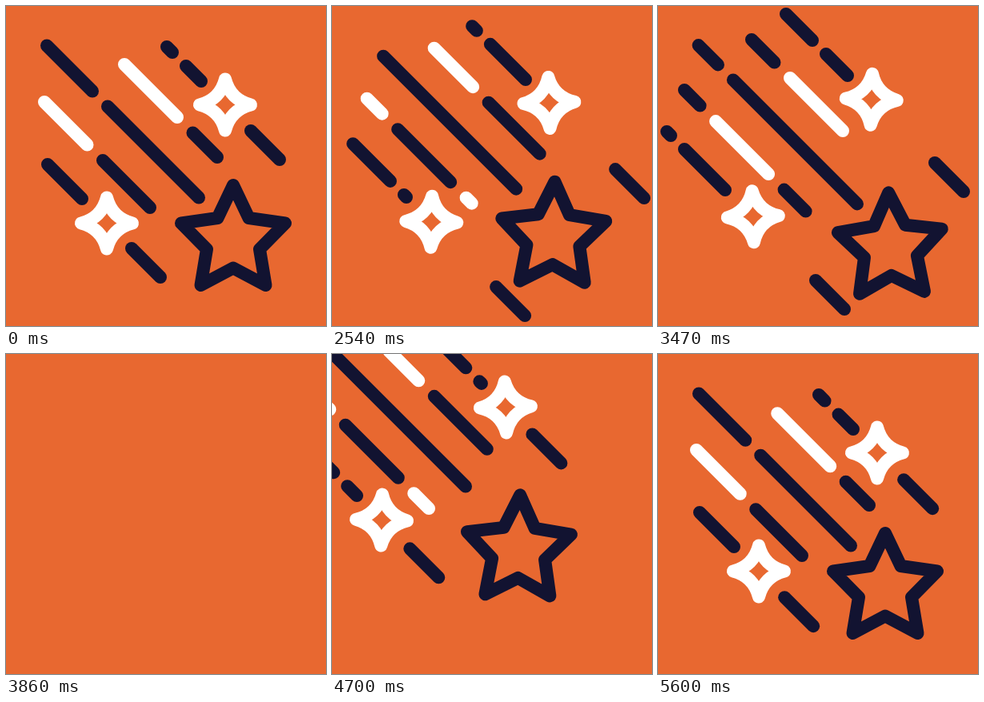
These frames come from a looping animation (400x400 px, 5630 ms). An HTML page with a canvas:

```html
<!DOCTYPE html>
<html lang="en">
<head>
<meta charset="utf-8">
<title>Shooting star</title>
<style>
  html, body { margin: 0; width: 100%; height: 100%; overflow: hidden; background: #e86830; }
  canvas { display: block; width: 100vmin; height: 100vmin; }
</style>
</head>
<body>
<canvas id="stage" width="400" height="400"></canvas>
<script>
const ctx = document.getElementById('stage').getContext('2d');
const ORANGE = '#e86830', DARK = '#121331', WHITE = '#fff';
const LOOP = 5630, REST = 2030, MOVE = 3600, STEP = 30, WRAP = 1830;
const TIMES = [0, 960, 1440, 2370, 2970, 3580];

// Every trail lies on the diagonal y = x + d and shows a moving dash pattern between from and to.
// flow: distance the dashes have run back at each of TIMES.
const striped = { dash: 66, period: 85.5, flow: [0, 69, 139, 330, 438, 513] };
const ahead = { dash: 36, period: 102, flow: [0, 103, 164, 272, 337, 408], back: 0, launch: 1440 };
const trails = [
  { d: -150, from: 201, to: 244, first: 225, dash: 51, period: 68, grow: 34,
    flow: [0, 57, 144, 268, 374, 408], back: 7, launch: 1440, enter: 308 },
  { ...striped, d: -75, from: 132, to: 264, first: 148, colors: [WHITE, DARK],
    back: 15, launch: 1440, enter: 326 },
  { d: -1.5, from: 51, to: 241, first: 127, dash: 166, period: 185,
    flow: [0, 116, 226, 395, 479, 555], back: 16, launch: 1250, lag: 40, enter: 305 },
  { ...striped, d: 72, from: 48, to: 180, first: 35.5, colors: [WHITE, DARK],
    back: 15, launch: 1270, lag: 170, enter: 318 },
  { d: 146, from: 52, to: 95, first: 49, dash: 51, period: 68, grow: 34,
    flow: [0, 57, 145, 265, 345, 408], back: 7, launch: 1440, enter: 345 },
  { ...ahead, d: -150, from: 303, to: 393, first: 306, enter: 308 },
  { ...ahead, d: 146, from: 154, to: 244, first: 157, enter: 330 }
];

const starPath = new Path2D(
  'M0-69L19.5-28L65-21.5L33 11L40.5 56L0 34.5L-40.5 56L-33 11L-65-21.5L-19.5-28Z');
const sparkPath = new Path2D(
  'M0-32Q6.5-6.5 32 0Q6.5 6.5 0 32Q-6.5 6.5-32 0Q-6.5-6.5 0-32Z');
// nudge: small displacement while shaking; even / odd: tilt in degrees on alternate steps
const shapes = [
  { path: starPath, color: DARK, x: 284, y: 293, back: 16, launch: 1250, enter: 265,
    even: -2, odd: 1.5, nudge: [[-1.4, 1.4], [-1.5, 1.5]] },
  { path: sparkPath, color: WHITE, x: 274, y: 123.5, back: 9, launch: 1440, enter: 308,
    even: 2, odd: -2, nudge: [[1.8, 2.3], [0, 0]] },
  { path: sparkPath, color: WHITE, x: 126, y: 271.5, back: 6, launch: 1440, enter: 345,
    even: -2, odd: 1.5, nudge: [[-1.2, -2.2], [0, 0]] }
];

const smooth = u => (u = Math.min(1, Math.max(0, u)), u * u * (3 - 2 * u));

// Cubic curve through values at TIMES
function along(values, t) {
  const last = TIMES.length - 1;
  if (t >= TIMES[last]) return values[last];
  let i = 0;
  while (t >= TIMES[i + 1]) i++;
  const slope = j => {
    const a = Math.max(0, j - 1), b = Math.min(last, j + 1);
    return (values[b] - values[a]) / (TIMES[b] - TIMES[a]);
  };
  const h = TIMES[i + 1] - TIMES[i], u = (t - TIMES[i]) / h, s = smooth(u);
  return values[i] * (1 - s) + values[i + 1] * s
    + h * u * (1 - u) * ((1 - u) * slope(i) - u * slope(i + 1));
}

// Pull back, shoot out to the lower right, come in again from the upper left
function glide(t, { back, enter }, launch) {
  if (t < launch) return -back * smooth(t / launch);
  if (t < WRAP) return -back + (420 + back) * ((t - launch) / (WRAP - launch)) ** 2.6;
  const u = Math.max(0, (3590 - t) / (3590 - WRAP));
  return -(enter * u ** 2.6 + (420 - enter) * u ** 12);
}

function drawTrail(trail, t) {
  const { d, from, to, first, dash, period, flow, launch, lag = 0, grow = 0, colors = [DARK] } = trail;
  const offset = glide(t, trail, launch);
  const extra = grow * smooth(t / 800) * (1 - smooth((t - 2600) / 970));
  const start = from - extra + glide(t, trail, launch + lag);
  const end = to + offset;
  const origin = first + offset - along(flow, t);
  for (let i = Math.floor((start - origin) / period); origin + i * period < end; i++) {
    const a = Math.max(start, origin + i * period);
    const b = Math.min(end, origin + i * period + dash);
    if (b <= a) continue;
    const n = colors.length;
    ctx.strokeStyle = colors[((i % n) + n) % n];
    ctx.beginPath();
    ctx.moveTo(a, a + d);
    ctx.lineTo(b, b + d);
    ctx.stroke();
  }
}

function drawShape(shape, t, shaking, odd) {
  const offset = glide(t, shape, shape.launch);
  const [dx, dy] = shaking ? shape.nudge[odd] : [0, 0];
  ctx.save();
  ctx.translate(shape.x + offset + dx, shape.y + offset + dy);
  if (shaking) ctx.rotate((odd ? shape.odd : shape.even) * Math.PI / 180);
  ctx.strokeStyle = shape.color;
  ctx.stroke(shape.path);
  ctx.restore();
}

function draw(now) {
  const clock = now % LOOP - REST;
  const step = Math.floor(clock / STEP);
  const t = Math.max(0, step * STEP);
  const shaking = step >= 0 && step < MOVE / STEP - 1;
  ctx.fillStyle = ORANGE;
  ctx.fillRect(0, 0, 400, 400);
  ctx.lineWidth = 16;
  ctx.lineCap = ctx.lineJoin = 'round';
  trails.forEach(trail => drawTrail(trail, t));
  shapes.forEach(shape => drawShape(shape, t, shaking, Math.abs(step % 2)));
}

const begin = performance.now();
function tick() {
  draw(performance.now() - begin);
  requestAnimationFrame(tick);
}
tick();
</script>
</body>
</html>
```
